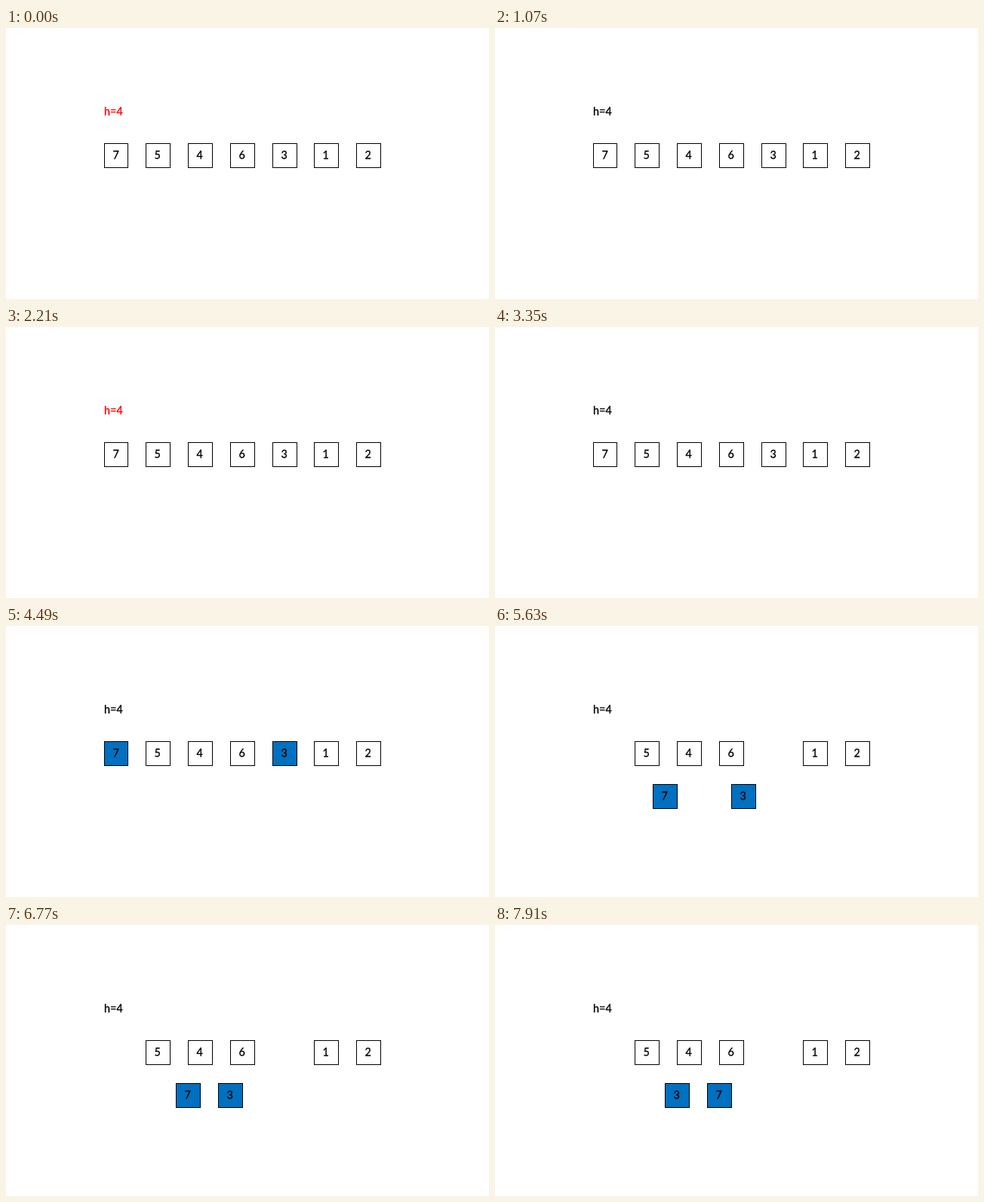
Write an HTML page that moves like this. It is 640 px wide and 360 px high and loops after 8000 ms.

```html
<!DOCTYPE html>
<html lang="en">
<head>
<meta charset="utf-8">
<title>Shell sort, gap 4</title>
<style>
  html, body { margin: 0; width: 100%; height: 100%; overflow: hidden; background: #fff; }
  svg { display: block; width: 640px; height: 360px; }
  text { font: 400 14.4px Lato, Carlito, sans-serif; fill: #000; stroke: #000; stroke-width: .3px; }
  .digit { text-anchor: middle; }
  rect { fill: #fff; stroke: #000; stroke-width: 1px; }
  .picked rect { fill: #0070c0; }
  .lit { fill: #f00; stroke: #f00; }
</style>
</head>
<body>
<svg id="stage" viewBox="0 0 640 360"><text id="gap" x="130" y="116">h=4</text></svg>
<script>
const LOOP = 8000, ROW = 153, LOWER = 210;
const stage = document.getElementById('stage');
const gap = document.getElementById('gap');

function add(parent, tag, attrs) {
  const node = document.createElementNS('http://www.w3.org/2000/svg', tag);
  for (const key in attrs) node.setAttribute(key, attrs[key]);
  return parent.appendChild(node);
}

function makeBox(digit, x, width = 33) {
  const group = add(stage, 'g', {});
  const rect = add(group, 'rect', { x: .5, y: .5, height: 32 });
  add(group, 'text', { class: 'digit', x: 15.7, y: 21 }).textContent = digit;
  const place = (left, top, w = 33) => {
    group.setAttribute('transform', `translate(${left} ${top})`);
    rect.setAttribute('width', w - 1);
  };
  place(x, ROW, width);
  return { group, place };
}

[[5, 185], [4, 241], [6, 297], [1, 408], [2, 464]].forEach(([digit, x]) => makeBox(digit, x));
const seven = makeBox(7, 130, 32);
const three = makeBox(3, 353);

const home = { seven: [130, ROW, 32], three: [353, ROW] };
const lowered = (a, b) => ({ picked: true, seven: [a, LOWER], three: [b, LOWER] });
const steps = [
  { at: 0, lit: true, ...home },
  { at: 1070, ...home },
  { at: 2210, lit: true, ...home },
  { at: 3350, ...home },
  { at: 4490, picked: true, ...home },
  { at: 5630, ...lowered(209, 313) },
  { at: 6770, ...lowered(225, 281) },
  { at: 7910, ...lowered(281, 225) }
];

function show(step) {
  gap.classList.toggle('lit', !!step.lit);
  for (const box of [seven, three]) box.group.classList.toggle('picked', !!step.picked);
  seven.place(...step.seven);
  three.place(...step.three);
}

const start = performance.now();
let current;
function tick() {
  const t = (performance.now() - start) % LOOP;
  const step = steps.filter(s => s.at <= t).pop();
  if (step !== current) show(current = step);
  requestAnimationFrame(tick);
}
tick();
</script>
</body>
</html>
```
